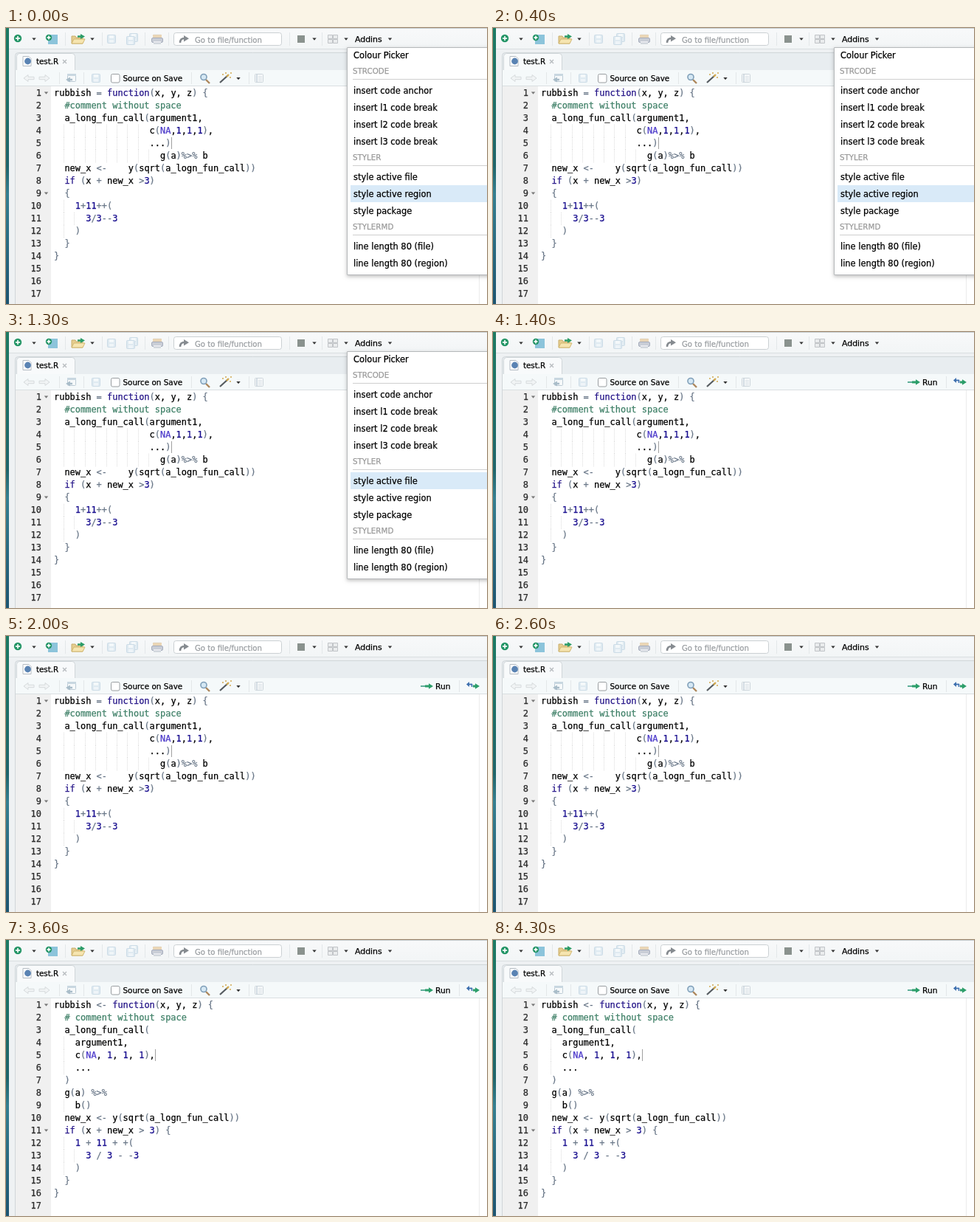
Animation of 652 by 374 pixels, one loop 4.4 s. Source, as an HTML page with a canvas:

```html
<!DOCTYPE html>
<html lang="en">
<head>
<meta charset="utf-8">
<title>Restyling code in an editor</title>
<style>
  html, body { margin: 0; width: 100%; height: 100%; overflow: hidden; background: #fff; }
  canvas { display: block; width: 652px; height: 374px; }
</style>
</head>
<body>
<canvas id="stage"></canvas>
<script>
const W = 652, H = 374, LOOP = 4400;
const HOVER_FILE = 500, MENU_CLOSED = 1400, RESTYLED = 3000;
const CELL = 7.2, LEFT = 65, TOP = 80, ROW = 17;
const UI = '"DejaVu Sans", sans-serif';
const CODE = '11.96px "DejaVu Sans Mono", monospace';

const canvas = document.getElementById('stage');
const ctx = canvas.getContext('2d');
const ratio = window.devicePixelRatio || 1;
canvas.width = W * ratio;
canvas.height = H * ratio;
ctx.scale(ratio, ratio);

const messy = `rubbish = function(x, y, z) {
  #comment without space
  a_long_fun_call(argument1,
                  c(NA,1,1,1),
                  ...)
                    g(a)%>% b
  new_x <-    y(sqrt(a_logn_fun_call))
  if (x + new_x >3)
  {
    1+11++(
      3/3--3
    )
  }
}`.split('\n');

const tidy = `rubbish <- function(x, y, z) {
  # comment without space
  a_long_fun_call(
    argument1,
    c(NA, 1, 1, 1),
    ...
  )
  g(a) %>%
    b()
  new_x <- y(sqrt(a_logn_fun_call))
  if (x + new_x > 3) {
    1 + 11 + +(
      3 / 3 - -3
    )
  }
}`.split('\n');

const tokens = [
  [/^#.*/, '#3d7f66'],
  [/^(function|if)\b/, '#221287'],
  [/^NA\b/, '#4e3ccb'],
  [/^[a-z_]\w*/, '#000'],
  [/^\d+/, '#170c8e'],
  [/^(%>%|<-|[-+*\/=<>(){}])/, '#687687'],
  [/^(\.\.\.|.)/, '#000']
];

// Menu rows: label, vertical centre, kind
const menu = [
  ['Colour Picker', 37], ['STRCODE', 58, 'head'],
  ['insert code anchor', 85], ['insert l1 code break', 108],
  ['insert l2 code break', 131], ['insert l3 code break', 154],
  ['STYLER', 175, 'head'],
  ['style active file', 202], ['style active region', 225], ['style package', 248],
  ['STYLERMD', 269, 'head'],
  ['line length 80 (file)', 296], ['line length 80 (region)', 319]
];

function rect(x, y, w, h, color) {
  ctx.fillStyle = color;
  ctx.fillRect(x, y, w, h);
}

function box(x, y, w, h, r, fill, stroke) {
  ctx.beginPath();
  ctx.roundRect(x, y, w, h, r);
  if (fill) { ctx.fillStyle = fill; ctx.fill(); }
  if (stroke) { ctx.strokeStyle = stroke; ctx.lineWidth = 1; ctx.stroke(); }
}

function dot(x, y, r, color) {
  ctx.beginPath();
  ctx.arc(x, y, r, 0, Math.PI * 2);
  ctx.fillStyle = color;
  ctx.fill();
}

function poly(points, fill, stroke) {
  ctx.beginPath();
  points.forEach(([x, y]) => ctx.lineTo(x, y));
  ctx.closePath();
  if (fill) { ctx.fillStyle = fill; ctx.fill(); }
  if (stroke) { ctx.strokeStyle = stroke; ctx.lineWidth = 1; ctx.stroke(); }
}

function line(x1, y1, x2, y2, color, width = 1) {
  ctx.beginPath();
  ctx.moveTo(x1, y1);
  ctx.lineTo(x2, y2);
  ctx.strokeStyle = color;
  ctx.lineWidth = width;
  ctx.stroke();
}

// Text with a hairline outline for a slightly heavier weight
function ink(text, x, y, color) {
  ctx.fillStyle = ctx.strokeStyle = color;
  ctx.lineWidth = 0.25;
  ctx.lineJoin = 'round';
  ctx.fillText(text, x, y);
  ctx.strokeText(text, x, y);
}

function label(text, x, y, size, color = '#000') {
  ctx.font = `${size}px ${UI}`;
  ink(text, x, y, color);
}

function faded(alpha, paint) {
  ctx.globalAlpha = alpha;
  paint();
  ctx.globalAlpha = 1;
}

function caret(x, y, color = '#333') {
  poly([[x - 2.7, y - 1.5], [x + 2.7, y - 1.5], [x, y + 1.8]], color);
}

function divider(x, y, h) {
  rect(x, y, 1, h, '#e3e7e9');
}

function plus(x, y, r) {
  dot(x, y, r, '#229465');
  rect(x - r * 0.6, y - 0.8, r * 1.2, 1.6, '#fff');
  rect(x - 0.8, y - r * 0.6, 1.6, r * 1.2, '#fff');
}

// Solid arrow, dir 1 points right and -1 left
function arrow(x, y, len, dir, fill, stroke, half = 4) {
  const tip = x + len * dir, neck = tip - 6 * dir, shaft = half * 0.38;
  poly([[x, y - shaft], [neck, y - shaft], [neck, y - half], [tip, y],
        [neck, y + half], [neck, y + shaft], [x, y + shaft]], fill, stroke);
}

function disk(x, y) {
  box(x - 5.5, y - 5.5, 11, 11, 1, '#dfeaf1', '#cbdbe6');
  rect(x - 3, y - 5, 6, 4, '#f4f8fa');
  rect(x - 3, y + 1, 6, 4, '#eef4f8');
}

function folder() {
  poly([[89, 11], [94, 11], [95, 13], [104, 13], [104, 21], [89, 21]], '#e6cd8f', '#c8ad6b');
  poly([[92, 15], [107, 15], [104, 21], [89, 21]], '#f6e5b0', '#d1b770');
  arrow(97, 11.5, 10, 1, '#2c9c68', null, 3.6);
}

function printer() {
  rect(200, 8, 10, 6, '#e9eef3');
  box(197.5, 13.5, 15, 6, 1.5, '#b9bfcb', '#959daf');
  rect(199, 9, 12, 4, '#e8cda2');
  rect(200, 18, 10, 3, '#f5f6f8');
  line(200, 21, 210, 21, '#9aa3b1');
}

function gridIcon() {
  for (let i = 0; i < 4; i++)
    box(436.5 + (i % 2) * 7, 9.5 + (i >> 1) * 6, 6, 5, 0, '#e8eaeb', '#b6babd');
}

function mainToolbar() {
  const shade = ctx.createLinearGradient(0, 0, 0, 29);
  shade.addColorStop(0, '#f8f9fa');
  shade.addColorStop(1, '#f2f5f6');
  rect(4, 0, W, 29, shade);
  rect(4, 0, W, 1, '#c6cccf');
  rect(4, 28, W, 1, '#d9dee0');

  plus(16, 14, 5.2);
  caret(38, 15);
  box(57, 9, 13, 13, 0, '#8cc4db');
  plus(58, 13, 4.2);
  divider(80, 6, 18);
  folder();
  caret(117, 15);
  divider(130, 6, 18);
  disk(143, 15);
  disk(173, 13);
  disk(169, 17);
  divider(188, 6, 18);
  faded(0.75, printer);
  divider(220, 6, 18);

  box(227.5, 6.5, 146, 17, 3, '#fff', '#cbd0d3');
  ctx.beginPath();
  ctx.moveTo(236, 20);
  ctx.quadraticCurveTo(236, 14, 242, 14);
  ctx.strokeStyle = '#868b90';
  ctx.lineWidth = 2.6;
  ctx.stroke();
  poly([[241, 10], [248, 14.3], [241, 18.5]], '#868b90');
  label('Go to file/function', 256, 19.5, 10.15, '#999da1');

  divider(384, 6, 18);
  box(395, 10, 10, 10, 0, '#8a928e');
  caret(418, 15);
  divider(428, 6, 18);
  faded(0.8, gridIcon);
  caret(461, 15);
  label('Addins', 473, 19, 10.9);
  caret(520.5, 15);
}

function tabStrip() {
  rect(4, 28, W, H, '#eef1f3');
  box(12.5, 33.5, 700, 400, 4, '#e8edf0', '#d0d6d9');
  box(14.5, 34.5, 79, 26, [4, 4, 0, 0], '#f8fafb', '#d0d6d9');
  poly([[23, 38.5], [31, 38.5], [34, 41.5], [34, 51.5], [23, 51.5]], '#fff', '#b4bbc2');
  dot(29.5, 45, 4.4, '#5a83b3');
  label('test.R', 41, 49, 10.3);
  line(77, 43, 82, 48, '#b9bdc1', 1.4);
  line(82, 43, 77, 48, '#b9bdc1', 1.4);
}

function paneToolbar() {
  rect(13, 57, W, 22, '#f5f9fa');
  rect(13, 78, W, 1, '#d9dfe1');
  arrow(38, 68, 14, -1, '#f1f4f5', '#d6dadc', 4.5);
  arrow(45, 68, 14, 1, '#f1f4f5', '#d6dadc', 4.5);
  divider(72, 60, 16);

  box(83.5, 62.5, 11, 10, 1, '#f6f9fa', '#bccbd5');
  rect(83, 62, 12, 3, '#c8d7e0');
  arrow(90, 70, 9, -1, '#a9bdc9', null, 3.5);
  divider(105, 60, 16);
  disk(122, 68);

  box(142.5, 62.5, 11.5, 11.5, 2, '#fff', '#9a9ea1');
  label('Source on Save', 158.5, 72, 10.4);
  divider(251, 60, 16);

  line(271, 70, 276, 75, '#ad875c', 2.4);
  dot(268, 66.5, 4.8, '#7f9eb8');
  dot(268, 66.5, 3.2, '#d5e8f4');

  line(290, 74, 301, 64, '#555b60', 2.2);
  line(299, 66, 302, 63, '#d5ab50', 2.4);
  [[294, 63], [298, 61], [304, 67], [305, 61]].forEach(([x, y]) => dot(x, y, 1, '#d0a74f'));
  caret(315, 68.5);
  divider(329, 60, 16);

  box(337.5, 62.5, 11, 11, 1, '#f7f9fa', '#ccd5db');
  rect(339, 63, 2, 10, '#d2dce3');
  for (let y = 65; y < 73; y += 2) rect(342, y, 5, 1, '#dbe2e7');

  rect(562, 67, 6, 2, '#5fae9a');
  arrow(568, 68, 11, 1, '#2c9e6a', null, 3.8);
  label('Run', 582, 72, 10.7);
  divider(614, 60, 16);
  poly([[624, 65.5], [628, 62], [628, 69]], '#3d6fae');
  line(627, 65.5, 632, 65.5, '#3d6fae', 1.8);
  line(631.5, 65, 631.5, 69, '#3d6fae', 1.6);
  arrow(633, 68, 9, 1, '#2c9e6a', null, 3.8);
}

function codeLine(text, row) {
  const y = TOP + row * ROW;
  const indent = text.search(/\S/);
  for (let col = 2; col < indent; col += 2) {
    const x = Math.floor(LEFT + col * CELL) - 1;
    for (let d = 0; d < ROW; d += 2) rect(x, y + d, 1, 1, '#dcdcdc');
  }
  ctx.font = CODE;
  for (let col = indent; col < text.length;) {
    const rest = text.slice(col);
    const [rule, color] = tokens.find(([re]) => re.test(rest));
    const word = rest.match(rule)[0];
    ink(word, LEFT + col * CELL, y + 12, color);
    col += word.length;
  }
}

function editor(lines, folds, cursorCol) {
  rect(13, 79, W, H, '#fff');
  rect(13, 79, 48, H, '#f0f0f0');
  rect(641, 79, 1, H, '#ececec');
  ctx.font = CODE;
  ctx.textAlign = 'right';
  for (let n = 1; n <= 17; n++) ink(n, 48, TOP + (n - 1) * ROW + 12, '#2b2b2b');
  ctx.textAlign = 'left';
  folds.forEach(n => caret(54.5, TOP + (n - 1) * ROW + 8, '#777'));
  lines.forEach(codeLine);
  rect(Math.floor(LEFT + cursorCol * CELL) + 1, TOP + 4 * ROW, 1, ROW - 1, '#a0a0a0');
}

function addinsMenu(active) {
  ctx.save();
  ctx.shadowColor = 'rgba(0,0,0,.25)';
  ctx.shadowBlur = 5 * ratio;
  ctx.shadowOffsetY = 2 * ratio;
  rect(462, 26, 200, 309, '#fff');
  ctx.restore();
  box(462.5, 26.5, 200, 308, 0, '#fff', '#b5b8ba');
  for (const [text, y, kind] of menu) {
    if (text === active) rect(467, y - 12, W, 23, '#d9eaf8');
    if (kind) {
      label(text, 470, y + 4, 10.3, '#999');
      rect(470, y + 11, W, 1, '#cfcfcf');
    } else {
      label(text, 471, y + 4, 11.45);
    }
  }
}

function desktop() {
  const shade = ctx.createLinearGradient(0, 0, 0, H);
  shade.addColorStop(0, '#1c7a62');
  shade.addColorStop(0.5, '#1f656a');
  shade.addColorStop(0.6, '#357f90');
  shade.addColorStop(1, '#1c5470');
  rect(0, 0, 4, H, shade);
}

function draw(t) {
  ctx.clearRect(0, 0, W, H);
  tabStrip();
  mainToolbar();
  paneToolbar();
  if (t < RESTYLED) editor(messy, [1, 9], 22);
  else editor(tidy, [1, 11], 19);
  desktop();
  if (t < MENU_CLOSED) addinsMenu(t < HOVER_FILE ? 'style active region' : 'style active file');
}

function tick() {
  draw(performance.now() % LOOP);
  requestAnimationFrame(tick);
}
tick();
</script>
</body>
</html>
```
